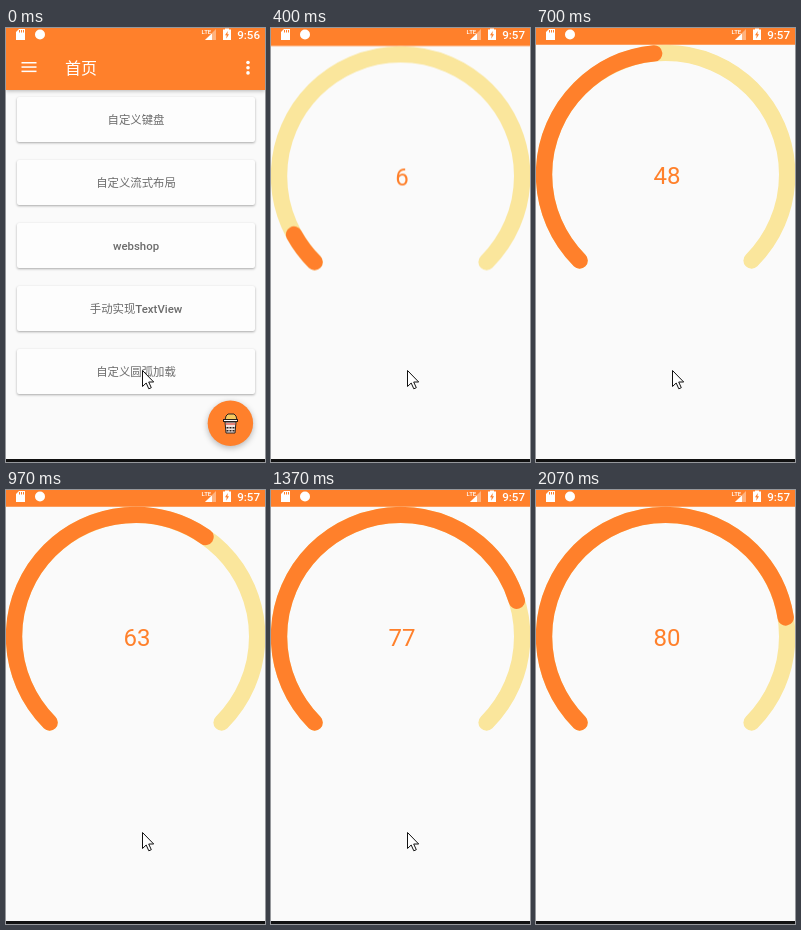
Animation, 259 px wide and 434 px high, one loop 2.63 s. Source, as an HTML page with a canvas:

```html
<!DOCTYPE html>
<html lang="zh">
<head>
<meta charset="utf-8">
<style>
html, body { margin: 0; width: 100%; height: 100%; overflow: hidden; background: #fafafa; }
canvas { display: block; }
</style>
</head>
<body>
<canvas id="stage" width="259" height="434"></canvas>
<script>
const W = 259, H = 434, LOOP = 2630, BAR = 16.5;
const OPEN = 250, SETTLE = 400, RUN = 550, NUDGE = 1950, HIDE = 2070;
const ORANGE = '#ff802b', PALE = '#fae69c', PAPER = '#fafafa', INK = '#2b211e';
const FONT = 'Roboto, "Noto Sans CJK SC", "Noto Sans CJK", sans-serif';
const LABELS = ['自定义键盘', '自定义流式布局', 'webshop', '手动实现TextView', '自定义圆弧加载'];

const screen = document.getElementById('stage').getContext('2d');
const layer = document.createElement('canvas');
layer.width = W;
layer.height = H;
let ctx = screen;

function rect(x, y, w, h, color) {
  ctx.fillStyle = color;
  ctx.fillRect(x, y, w, h);
}

function disc(x, y, r, color) {
  ctx.fillStyle = color;
  ctx.beginPath();
  ctx.arc(x, y, r, 0, 7);
  ctx.fill();
}

function poly(points, fill, stroke) {
  ctx.beginPath();
  points.forEach(([x, y]) => ctx.lineTo(x, y));
  ctx.closePath();
  if (fill) { ctx.fillStyle = fill; ctx.fill(); }
  if (stroke) { ctx.strokeStyle = stroke; ctx.lineWidth = 1; ctx.stroke(); }
}

function text(str, x, y, size, color, align = 'center', weight = 400) {
  ctx.font = `${weight} ${size}px ${FONT}`;
  ctx.textAlign = align;
  ctx.fillStyle = color;
  ctx.fillText(str, x, y);
}

function shaded(blur, dy, alpha, draw) {
  ctx.save();
  ctx.shadowColor = `rgba(0,0,0,${alpha})`;
  ctx.shadowBlur = blur;
  ctx.shadowOffsetY = dy;
  draw();
  ctx.restore();
}

function card(label, i) {
  const y = 69 + i * 63;
  shaded(2.5, 1, 0.33, () => {
    ctx.fillStyle = '#fdfdfd';
    ctx.beginPath();
    ctx.roundRect(11, y, 238, 45, 2);
    ctx.fill();
  });
  text(label, 130, y + 27, 11.4, '#6c6c6c', 'center', 500);
}

function cup() {
  poly([[219, 394], [230, 394], [229, 405], [220, 405]], '#f4e6e0', INK);
  rect(220, 395, 9, 2, '#e9847a');
  for (let i = 0; i < 6; i++) rect(220.5 + i % 3 * 3, 399 + (i > 2) * 3, 2, 1.5, INK);
  poly([[219, 392], [220, 388], [222, 386], [228, 386], [230, 388], [231, 392]], '#f6c95e', INK);
  rect(217, 391, 15, 3, INK);
  rect(218, 392, 13, 1, '#fff');
}

function home() {
  rect(0, 0, W, H, PAPER);
  LABELS.forEach(card);
  shaded(4, 1, 0.28, () => rect(0, 0, W, 62, ORANGE));
  for (let i = 0; i < 3; i++) {
    rect(15.5, 34 + i * 4.3, 15, 1.5, '#fff');
    disc(242, 34.5 + i * 5.2, 1.8, '#fff');
  }
  text('首页', 59, 45.5, 16, '#fff', 'left', 500);
  shaded(6, 2, 0.28, () => disc(224.4, 395.3, 22.7, ORANGE));
  cup();
}

function ring(percent, color) {
  const from = Math.PI * 0.75;
  ctx.beginPath();
  ctx.arc(129.6, BAR + 130, 121.6, from, from + Math.PI * 1.5 * percent / 100);
  ctx.lineWidth = 16.4;
  ctx.lineCap = 'round';
  ctx.strokeStyle = color;
  ctx.stroke();
  ctx.lineCap = 'butt';
}

function gauge(percent) {
  ctx.clearRect(0, 0, W, H);
  rect(0, BAR, W, H, PAPER);
  ring(100, PALE);
  ring(percent, ORANGE);
  text(percent, 131, 155.7, 24, ORANGE);
}

// Decelerating count to 80, refreshed about seven times a second.
function progress(t) {
  if (t < RUN) return 6;
  const tick = Math.min(10, Math.floor((t - 220) / 142));
  const left = (10.2 - tick) / 11.4;
  return Math.floor(80.1 * (1 - left * left));
}

function statusBar(clock) {
  rect(0, 0, W, BAR, ORANGE);
  poly([[13, 1], [19, 1], [19, 12], [10, 12], [10, 4]], '#fff');
  for (let x = 13; x < 18; x += 2) rect(x, 2, 1, 2.5, ORANGE);
  disc(34, 6.5, 5, '#fff');
  poly([[210, 1], [210, 12], [199, 12]], 'rgba(255,255,255,.4)');
  poly([[206, 5.5], [206, 12], [199, 12]], '#fff');
  text('LTE', 195.5, 6, 6, '#fff', 'left', 500);
  rect(219, 0.5, 4, 2, '#fff');
  rect(217, 1.5, 8, 10.5, '#fff');
  poly([[221.8, 3], [219, 7.3], [220.7, 7.3], [220.2, 10.7], [223, 6.3], [221.4, 6.3]], ORANGE);
  text(clock, 254, 11, 11.6, '#fff', 'right', 500);
}

function pointer(x, y) {
  ctx.save();
  ctx.translate(x + 0.5, y + 0.5);
  poly([[0, 0], [0, 16], [3.7, 12.5], [6.3, 18.3], [8.8, 17.2], [6.2, 11.5], [11.2, 11.5]], '#fff', '#111');
  ctx.restore();
}

function draw(t) {
  const opening = t < SETTLE;
  if (opening) home();
  else rect(0, 0, W, 62, ORANGE);

  if (t >= OPEN) {
    ctx = layer.getContext('2d');
    gauge(progress(t));
    ctx = screen;
    ctx.globalAlpha = opening ? 0.27 : 1;
    ctx.drawImage(layer, 0, opening ? 28 : t < RUN ? 1.5 : 0);
    ctx.globalAlpha = 1;
  }

  statusBar(t < OPEN ? '9:56' : '9:57');
  rect(0, 431, W, 3, '#111');
  if (t < NUDGE) pointer(136, 342);
  else if (t < HIDE) pointer(142, 351);
}

const begin = performance.now();
function tick() {
  draw((performance.now() - begin) % LOOP);
  requestAnimationFrame(tick);
}
tick();
</script>
</body>
</html>
```
